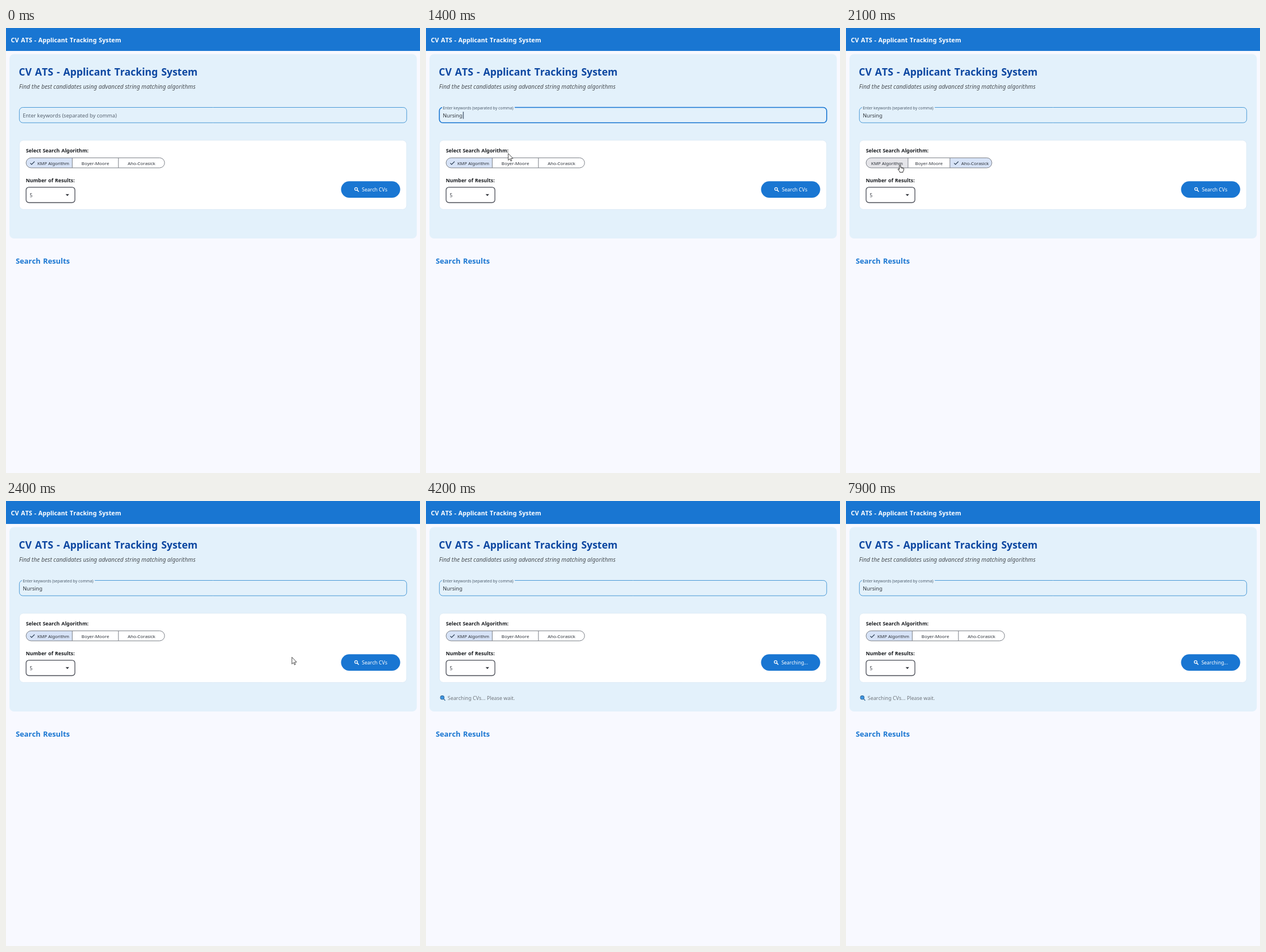
An HTML page with a canvas that plays this animation: 721 by 776 pixels, repeating every 8 s.

```html
<!DOCTYPE html>
<html lang="en">
<head>
<meta charset="utf-8">
<title>CV ATS</title>
<style>
html, body { margin: 0; width: 100%; height: 100%; overflow: hidden; background: #f8f9ff; }
canvas { display: block; width: 721px; height: 776px; }
</style>
</head>
<body>
<canvas id="stage"></canvas>
<script>
const W = 721, H = 776, LOOP = 8000, STEP = 100;
const BLUE = '#1976d2', INK = '#191c20', LINE = '#7c8088';
const FAMILY = '"Noto Sans", "Open Sans", sans-serif';
const canvas = document.getElementById('stage');
const ctx = canvas.getContext('2d');
const ratio = window.devicePixelRatio || 1;
canvas.width = W * ratio;
canvas.height = H * ratio;

// Moments of the user's actions, in ms
const FOCUS = 300, TYPE = 700, KEY = 100, BLUR = 1600, SEARCH = 2600;
const WORD = 'Nursing';
const PICKS = [[0, 0], [1600, 1], [1900, 2], [2200, 0]];
const NAMES = ['KMP Algorithm', 'Boyer-Moore', 'Aho-Corasick'];
const SEG_WIDTH = [80.4, 72.1, 73];
const PATH = [
  [200, 4, 200], [400, 78, 155], [1200, 78, 155], [1500, 166, 241],
  [1700, 168, 241], [1900, 222, 240], [2100, 94, 239], [2200, 92, 239],
  [2500, 640, 284], [2700, 640, 284], [2800, 425, 342]
];

const clamp = v => Math.max(0, Math.min(1, v));
const mix = (a, b, p) => a + (b - a) * p;
const ease = p => p * p * (3 - 2 * p);

function text(str, x, y, size, color, weight = 400, align = 'left', style = '') {
  ctx.font = `${style} ${weight} ${size}px ${FAMILY}`;
  ctx.fontKerning = 'none';
  ctx.wordSpacing = weight === 700 ? `${size * 0.08}px` : '0px';
  ctx.textAlign = align;
  ctx.fillStyle = color;
  ctx.fillText(str, x, y);
  return ctx.measureText(str).width;
}

function box(x, y, w, h, r, fill, stroke, width = 1) {
  ctx.beginPath();
  ctx.roundRect(x, y, w, h, r);
  paint(fill, stroke, width);
}

function paint(fill, stroke, width = 1) {
  if (fill) { ctx.fillStyle = fill; ctx.fill(); }
  if (stroke) { ctx.strokeStyle = stroke; ctx.lineWidth = width; ctx.stroke(); }
}

function poly(points, fill, stroke, width, closed = true) {
  ctx.beginPath();
  points.forEach(([x, y]) => ctx.lineTo(x, y));
  if (closed) ctx.closePath();
  paint(fill, stroke, width);
}

function lens(x, y, r, tail, color, width, glass) {
  poly([[x + r * 0.7, y + r * 0.7], [x + tail, y + tail]], null, color, width * 1.2, false);
  ctx.beginPath();
  ctx.arc(x, y, r, 0, Math.PI * 2);
  paint(glass, color, width);
}

function pointerAt(t) {
  const last = PATH.length - 1;
  if (t < PATH[0][0] || t > PATH[last][0]) return null;
  for (let i = 0; i < last; i++) {
    const [t0, x0, y0] = PATH[i], [t1, x1, y1] = PATH[i + 1];
    if (t <= t1) {
      const p = ease((t - t0) / (t1 - t0));
      return { x: mix(x0, x1, p), y: mix(y0, y1, p) };
    }
  }
}

const inside = (p, x, y, w, h) => p && p.x >= x && p.x < x + w && p.y >= y && p.y < y + h;

function drawField(t) {
  const focused = t >= FOCUS && t < BLUR;
  const lift = ease(clamp((t - FOCUS) / 200));
  box(23.3, 138.5, 674.5, 26.7, 6, null, focused ? BLUE : '#4a9ad6', focused ? 1.6 : 1);
  if (lift > 0) {
    ctx.fillStyle = '#e3f1fb';
    ctx.fillRect(28, 137, 126.5 * lift, 3);
  }
  text('Enter keywords (separated by comma)', 29.2, mix(156, 141.6, lift),
    mix(9.09, 6.82, lift), lift > 0.5 ? '#4d5c6c' : '#586370');
  const typed = WORD.slice(0, Math.max(0, Math.floor((t - TYPE) / KEY) + 1));
  const w = text(typed, 29.2, 156.2, 9.05, '#33383e');
  if (focused) {
    ctx.fillStyle = '#263a50';
    ctx.fillRect(30 + w + (typed ? 0.4 : 0), 146, 1.1, 12.5);
  }
}

function drawSegments(t, pointer) {
  const picked = PICKS.filter(p => p[0] <= t).pop()[1];
  const sw = SEG_WIDTH[picked], x0 = 35, y0 = 226.4, h = 17.5;
  ctx.save();
  ctx.beginPath();
  ctx.roundRect(x0, y0, sw * 3, h, h / 2);
  ctx.clip();
  NAMES.forEach((name, i) => {
    const x = x0 + sw * i;
    const hover = inside(pointer, x, y0, sw, h);
    ctx.fillStyle = i === picked ? (hover ? '#c4d1e5' : '#d7e3f7') : (hover ? '#e5e5e9' : '#ffffff');
    ctx.fillRect(x, y0, sw, h);
  });
  ctx.restore();
  box(x0, y0, sw * 3, h, h / 2, null, LINE);
  NAMES.forEach((name, i) => {
    const x = x0 + sw * i, on = i === picked;
    if (i) poly([[x, y0], [x, y0 + h]], null, LINE, 1, false);
    const mid = x + sw / 2 + (on ? 7.2 : 0);
    const w = text(name, mid, 238.7, 7.8, '#2b3038', 500, 'center');
    if (on) {
      const cx = mid - w / 2 - 13;
      poly([[cx + 0.5, 235.6], [cx + 2.9, 238], [cx + 8, 232.8]], null, '#26384f', 1.2, false);
    }
  });
}

function drawButton(t, pointer) {
  const busy = t >= SEARCH;
  const hover = inside(pointer, 583.5, 267, 103, 29);
  box(583.5, 267.2, 103, 28.8, 14.4, hover ? '#2b81d6' : BLUE);
  const shift = busy ? -0.8 : 0;
  lens(609.7 + shift, 280.7, 2.4, 4.7, '#ffffff', 1.2);
  text(busy ? 'Searching...' : 'Search CVs', 619.7 + shift, 285.3, busy ? 8.45 : 8.6, '#ffffff');
}

function drawStatus() {
  lens(28.3, 342.8, 3.2, 5.2, '#3a6d9c', 1.1, '#3b97e6');
  text('Searching CVs... Please wait.', 37.8, 347, 8.85, '#70767d', 500);
}

function drawPointer(p) {
  ctx.save();
  ctx.translate(p.x, p.y);
  ctx.lineJoin = 'round';
  if (inside(p, 23, 138, 675, 27)) {
    const cap = [[-2, -5], [0, -4.4], [2, -5]];
    const line = points => poly(points, null, '#26323c', 1.1, false);
    line(cap);
    line(cap.map(([x, y]) => [x, -y]));
    line([[0, -4.4], [0, 4.4]]);
  } else if (inside(p, 35, 226, 241, 18) || inside(p, 583, 267, 103, 29)) {
    poly([[-1, 0.4], [0, -0.4], [1, 0.4], [1.1, 4.2], [3, 4.2], [5, 4.9], [6.7, 5.8],
      [6.6, 9], [5.2, 11], [5.1, 12.7], [-0.2, 12.7], [-0.6, 11], [-3.2, 8],
      [-3.3, 6.9], [-2.3, 6.6], [-1, 7.6]], '#ffffff', '#1c1c1c', 0.9);
    poly([[2.6, 4.4], [2.7, 6.6]], null, '#1c1c1c', 0.6, false);
    poly([[4.5, 4.9], [4.5, 6.8]], null, '#1c1c1c', 0.6, false);
  } else {
    poly([[0, 0], [0, 12], [2.7, 9.4], [4.5, 13.4], [6.2, 12.6], [4.5, 8.8], [8.2, 8.6]],
      '#ffffff', '#1c1c1c', 0.8);
  }
  ctx.restore();
}

function draw(t) {
  const pointer = pointerAt(t);
  ctx.setTransform(ratio, 0, 0, ratio, 0, 0);
  ctx.fillStyle = '#f8f9ff';
  ctx.fillRect(0, 0, W, H);
  ctx.fillStyle = BLUE;
  ctx.fillRect(0, 0, W, 40);
  text('CV ATS - Applicant Tracking System', 8.6, 25, 10.72, '#ffffff', 700);

  box(6, 45.5, 709.5, 321.5, 8, '#e3f1fb');
  text('CV ATS - Applicant Tracking System', 22.3, 83.4, 17.4, '#0d47a1', 700);
  text('Find the best candidates using advanced string matching algorithms',
    22.8, 106.3, 10.1, '#4b5055', 400, 'left', 'italic');
  drawField(t);

  box(23.3, 195.8, 674.4, 120.6, 7, '#ffffff', '#d9e8f4', 0.8);
  text('Select Search Algorithm:', 34.7, 217.4, 8.8, INK, 700);
  drawSegments(t, pointer);
  text('Number of Results:', 34.4, 269, 8.75, INK, 700);
  box(35, 277.6, 85, 26.9, 5, null, '#4a4d56', 1.3);
  text('5', 41.2, 294.5, 8.5, '#3a3e45');
  poly([[103.8, 289.8], [110, 289.8], [106.9, 292.9]], '#2c2f36');
  drawButton(t, pointer);
  if (t >= SEARCH) drawStatus();

  text('Search Results', 17, 410.5, 12.8, BLUE, 700);
  if (pointer) drawPointer(pointer);
}

const start = performance.now();
function tick() {
  const t = (performance.now() - start) % LOOP;
  draw(Math.floor(t / STEP) * STEP);
  requestAnimationFrame(tick);
}
tick();
</script>
</body>
</html>
```
